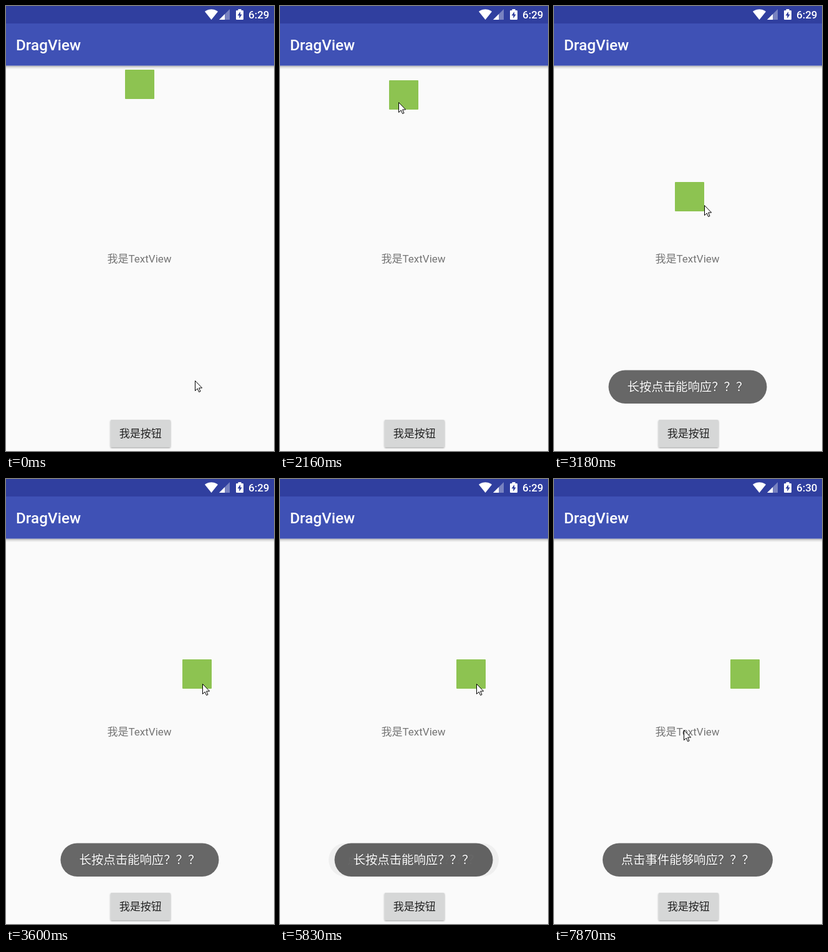
An HTML page that plays this animation: 430x713 px, repeating every 8 s.

```html
<!DOCTYPE html>
<html lang="zh-CN">
<head>
<meta charset="utf-8">
<title>DragView</title>
<style>
  html, body { margin: 0; width: 100%; height: 100%; overflow: hidden; background: #fafafa; }
  svg { display: block; width: 430px; height: 713px; }
  text { font: 17px Roboto, "Noto Sans CJK SC", "Noto Sans CJK", sans-serif; }
  .medium { font-weight: 500; }
  .toast text { font-size: 19.4px; fill: #fff; text-shadow: 0 0 2px rgba(0, 0, 0, .4); }
  .toast rect { fill: #000; fill-opacity: .59; }
</style>
</head>
<body>
<svg viewBox="0 0 430 713">
  <defs>
    <linearGradient id="shade" x2="0" y2="1">
      <stop stop-opacity=".3"/>
      <stop offset=".5" stop-opacity=".09"/>
      <stop offset="1" stop-opacity="0"/>
    </linearGradient>
    <filter id="lift" x="-10%" y="-10%" width="120%" height="130%">
      <feDropShadow dx="0" dy="1.2" stdDeviation="1" flood-opacity=".35"/>
    </filter>
  </defs>
  <rect width="430" height="713" fill="#fafafa"/>
  <rect y="95.6" width="430" height="6" fill="url(#shade)"/>
  <rect y="28" width="430" height="67.6" fill="#3f51b5"/>
  <rect width="430" height="28" fill="#303f9f"/>

  <g fill="#fff">
    <path transform="translate(318.7 2.6) scale(.9)" d="M12 21.5L23.6 7C23.2 6.7 18.7 3 12 3S.8 6.7.4 7Z"/>
    <path d="M342 22L359 5V22Z" opacity=".35"/>
    <path d="M342 22L351 13V22Z"/>
    <path d="M372.5 5h5v2h2.3q1.2 0 1.2 1.2v12.6q0 1.2-1.2 1.2h-9.6q-1.2 0-1.2-1.2V8.2q0-1.2 1.2-1.2h2.3Z"/>
    <text id="clock" class="medium" x="389" y="20">6:29</text>
    <text class="medium" x="16" y="71" style="font-size:24.3px">DragView</text>
  </g>
  <path d="M376 9L371.5 15.2H374.3V20L378.6 13.6H376Z" fill="#303f9f"/>

  <text x="162.5" y="411" fill="#757575">我是TextView</text>
  <rect x="167.5" y="663" width="96.5" height="44" rx="2" fill="#d6d7d7" filter="url(#lift)"/>
  <text class="medium" x="181.7" y="691" fill="#212121">我是按钮</text>

  <rect id="block" y="2" width="47" height="47" rx="1" fill="#8dc351"/>
  <g id="clickToast" class="toast">
    <rect x="78" y="583.5" width="273" height="53.5" rx="26.7"/>
    <text x="107.7" y="617">点击事件能够响应？？？</text>
  </g>
  <g id="pressToast" class="toast">
    <rect x="87.5" y="583.5" width="254" height="53.5" rx="26.7"/>
    <text x="117.5" y="617">长按点击能响应？？？</text>
  </g>
  <path id="cursor" d="M.5.5V16.5L4.2 13L6.6 18.5L9 17.5L6.6 12H11.6Z" fill="#fff" stroke="#000"/>
</svg>
<script>
// The screen refreshes at a fixed low rate; all times below count refreshes.
const LOOP = 8000, STEP = 204, PHASE = 88, FADE = 400 / STEP;
const [clock, block, clickToast, pressToast, cursor] =
  ["clock", "block", "clickToast", "pressToast", "cursor"].map(id => document.getElementById(id));

// Turning points: step, x, y
const cursorPath = [
  [1, 303, 600], [6, 213, 135], [8, 218, 131], [11, 190, 154], [13, 156, 241], [16, 241, 319],
  [18, 315, 328], [22, 211, 392], [27, 315, 328], [34, 315, 328], [39, 208, 402]
];
const blockPath = [
  [9, 191, 100], [11, 175, 117], [13, 135, 193], [15, 154, 261], [16, 194, 280], [18, 283, 287]
];

const clamp = v => Math.min(1, Math.max(0, v));
const ease = k => k * k * (3 - 2 * k);
const fadeIn = (step, start) => 1 - (1 - clamp((step - start) / FADE)) ** 2;
const fadeOut = (step, start) => 1 - clamp((step - start) / FADE) ** 2;

function place(el, path, step) {
  let [, x, y] = path[0];
  for (let i = 1; i < path.length; i++) {
    const [from, x0, y0] = path[i - 1], [to, x1, y1] = path[i];
    const k = ease(clamp((step - from) / (to - from)));
    x += (x1 - x0) * k;
    y += (y1 - y0) * k;
  }
  el.setAttribute("transform", `translate(${Math.round(x)} ${Math.round(y)})`);
}

function draw(time) {
  const step = Math.floor((time + PHASE) / STEP);
  place(cursor, cursorPath, step);
  place(block, blockPath, step);
  pressToast.style.opacity = fadeIn(step, 12.2) * fadeOut(step, 28.93);
  clickToast.style.opacity = fadeIn(step, 28.93);
  clock.textContent = step < 37 ? "6:29" : "6:30";
}

const start = performance.now();
(function frame() {
  draw((performance.now() - start) % LOOP);
  requestAnimationFrame(frame);
})();
</script>
</body>
</html>
```
